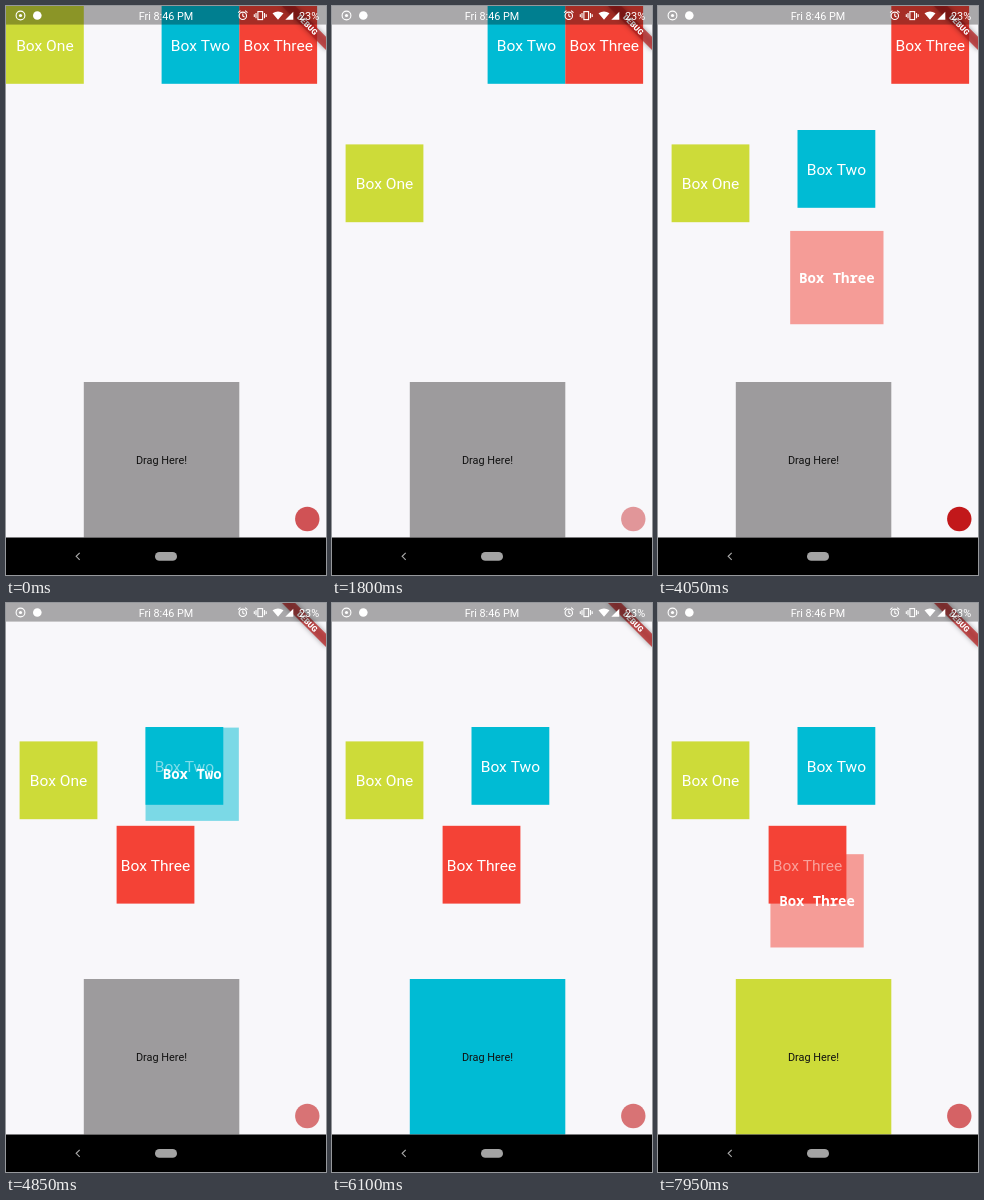
These frames come from a looping animation (320 px wide and 569 px high, 8 s). An HTML page with a canvas:

```html
<!DOCTYPE html>
<html lang="en">
<head>
<meta charset="utf-8">
<title>Drag and drop</title>
<style>
html, body { margin: 0; width: 100%; height: 100%; overflow: hidden; background: #000; }
canvas { display: block; width: 100%; height: 100%; }
</style>
</head>
<body>
<canvas id="stage" width="320" height="569"></canvas>
<script>
const LOOP = 8000;
const ctx = document.getElementById('stage').getContext('2d');
const SANS = 'Roboto, sans-serif';
const MONO = '"Noto Sans Mono", "DejaVu Sans Mono", monospace';
const BOX = 77.8, GHOST = 93.3, ZONE = 155.5, NAV_TOP = 531.5;

const boxes = [
  { name: 'Box One', rgb: '205,219,57', home: [0, 0] },
  { name: 'Box Two', rgb: '0,187,212', home: [155.6, 0] },
  { name: 'Box Three', rgb: '244,66,54', home: [233.3, 0] }
];

// Each path key is [time, x, y]; the last key is the release.
// A drag with a hover time ends inside the drop zone.
const drags = [
  { box: 0, path: [[450, 0, 0], [1000, 12, 85], [1550, 13.6, 138.4]] },
  { box: 1, path: [[1950, 155.6, 0], [2300, 144, 80], [2700, 139.5, 124]] },
  { box: 2, path: [[3350, 233.3, 0], [3700, 185, 130], [4050, 132.3, 224.8], [4400, 110.6, 222.8]] },
  { box: 1, hover: 5400, path: [[4800, 139.5, 124], [5100, 141, 165], [5350, 146, 320.7], [5700, 118, 400]] },
  { box: 0, hover: 6800, path: [[6300, 13.6, 138.4], [6800, 46, 335], [7200, 108, 398]] },
  { box: 2, path: [[7650, 110.6, 222.8], [7950, 112.4, 251], [8300, 125, 340]] }
];

// Cubic curve through timed points, at rest at both ends.
function along(path, t) {
  const last = path.length - 1;
  let i = 0;
  while (i < last - 1 && t > path[i + 1][0]) i++;
  const a = path[i], b = path[i + 1], span = b[0] - a[0];
  const u = Math.min(1, Math.max(0, (t - a[0]) / span));
  const slope = (n, axis) => n === 0 || n === last ? 0 :
    (path[n + 1][axis] - path[n - 1][axis]) / (path[n + 1][0] - path[n - 1][0]) * span;
  return [1, 2].map(axis => {
    const m = slope(i, axis), n = slope(i + 1, axis), d = b[axis] - a[axis];
    return a[axis] + u * (m + u * (3 * d - 2 * m - n + u * (m + n - 2 * d)));
  });
}

function rect(x, y, w, h, color) {
  ctx.fillStyle = color;
  ctx.fillRect(x, y, w, h);
}

function disc(x, y, r, color) {
  ctx.fillStyle = color;
  ctx.beginPath();
  ctx.arc(x, y, r, 0, 2 * Math.PI);
  ctx.fill();
}

function ring(x, y, r) {
  ctx.beginPath();
  ctx.arc(x, y, r, 0, 2 * Math.PI);
  ctx.stroke();
}

function lines(...polylines) {
  ctx.beginPath();
  for (const points of polylines)
    points.forEach(([x, y], i) => i ? ctx.lineTo(x, y) : ctx.moveTo(x, y));
  ctx.stroke();
}

function label(text, x, y, size, color, family = SANS, weight = 400) {
  ctx.font = `${weight} ${size}px ${family}`;
  ctx.textAlign = 'center';
  ctx.fillStyle = color;
  ctx.fillText(text, x, y + size * 0.345);
}

function drawBanner() {
  ctx.save();
  ctx.translate(320, 0);
  ctx.rotate(Math.PI / 4);
  ctx.shadowColor = 'rgba(0,0,0,.5)';
  ctx.shadowBlur = 5;
  rect(-31.1, 21.8, 62.2, 9.3, 'rgba(183,28,28,.72)');
  ctx.shadowColor = 'transparent';
  label('DEBUG', 0, 26.5, 7.9, '#fff', SANS, 900);
  ctx.restore();
}

function drawStatusBar() {
  rect(0, 0, 320, 18.6, 'rgba(0,0,0,.32)');
  ctx.strokeStyle = '#fff';
  ctx.lineWidth = 1.1;
  ring(14.5, 9.5, 4.4);
  disc(14.5, 9.5, 1.6, '#fff');
  disc(31.3, 9.5, 4.3, '#fff');
  label('Fri 8:46 PM', 160, 9.8, 10.8, '#fff');

  // Alarm clock
  ring(236.8, 9.8, 3.7);
  lines([[236.8, 7.5], [236.8, 10], [238.5, 11]],
    [[232.1, 6.7], [234.5, 4.7]], [[239.1, 4.7], [241.5, 6.7]]);
  // Vibrating phone
  ctx.strokeRect(251.9, 5.6, 4.7, 8);
  lines([[250, 7], [250, 12.2]], [[258.5, 7], [258.5, 12.2]],
    [[248.3, 8.2], [248.3, 11]], [[260.2, 8.2], [260.2, 11]]);
  // Wi-Fi and signal
  ctx.fillStyle = '#fff';
  ctx.beginPath();
  ctx.moveTo(272, 13.8);
  ctx.lineTo(266.5, 7.2);
  ctx.quadraticCurveTo(272, 3.6, 277.5, 7.2);
  ctx.moveTo(279.3, 13.7);
  ctx.lineTo(287.3, 13.7);
  ctx.lineTo(287.3, 5.7);
  ctx.fill();
  label('23%', 303, 9.8, 10.9, '#fff');
}

function drawNavBar() {
  rect(0, NAV_TOP, 320, 569 - NAV_TOP, '#000');
  ctx.strokeStyle = '#a5a5a5';
  ctx.lineWidth = 1.2;
  lines([[73.7, 546.8], [70.2, 550.3], [73.7, 553.8]]);
  ctx.fillStyle = '#a3a3a3';
  ctx.beginPath();
  ctx.roundRect(149, 546, 22, 8.8, 4.4);
  ctx.fill();
}

function drawRecordDot(t) {
  const phase = 0.43 + (t - 1800) * (t < 1800 ? 0.00148 : 0.0016);
  const alpha = 0.7 + 0.3 * Math.cos(2 * Math.PI * phase);
  disc(301.3, 513, 12.2, `rgba(194,22,24,${alpha})`);
}

function draw(t) {
  const places = boxes.map(box => box.home);
  let zoneColor = '#9d9b9d', active = null;
  for (const drag of drags) {
    const end = drag.path.at(-1);
    if (t >= end[0]) {
      if (drag.hover) zoneColor = `rgb(${boxes[drag.box].rgb})`;
      else places[drag.box] = end.slice(1);
    } else if (t >= drag.path[0][0]) {
      active = drag;
      if (t >= drag.hover) zoneColor = '#eee';
    }
  }

  rect(0, 0, 320, 569, '#f8f7fa');
  boxes.forEach((box, i) => {
    const [x, y] = places[i];
    rect(x, y, BOX, BOX, `rgb(${box.rgb})`);
    label(box.name, x + BOX / 2, y + BOX / 2 + 0.5, 15.55, '#fff');
  });
  rect(77.8, NAV_TOP - ZONE, ZONE, ZONE, zoneColor);
  label('Drag Here!', 155.5, 454.2, 10.9, '#111');

  if (active) {
    const [x, y] = along(active.path, t), box = boxes[active.box];
    rect(x, y, GHOST, GHOST, `rgba(${box.rgb},.5)`);
    label(box.name, x + GHOST / 2, y + GHOST / 2 + 0.3, 14, '#fff', MONO, 700);
  }
  drawBanner();
  drawStatusBar();
  drawNavBar();
  drawRecordDot(t);
}

const start = performance.now();
function tick() {
  draw((performance.now() - start) % LOOP);
  requestAnimationFrame(tick);
}
tick();
</script>
</body>
</html>
```
